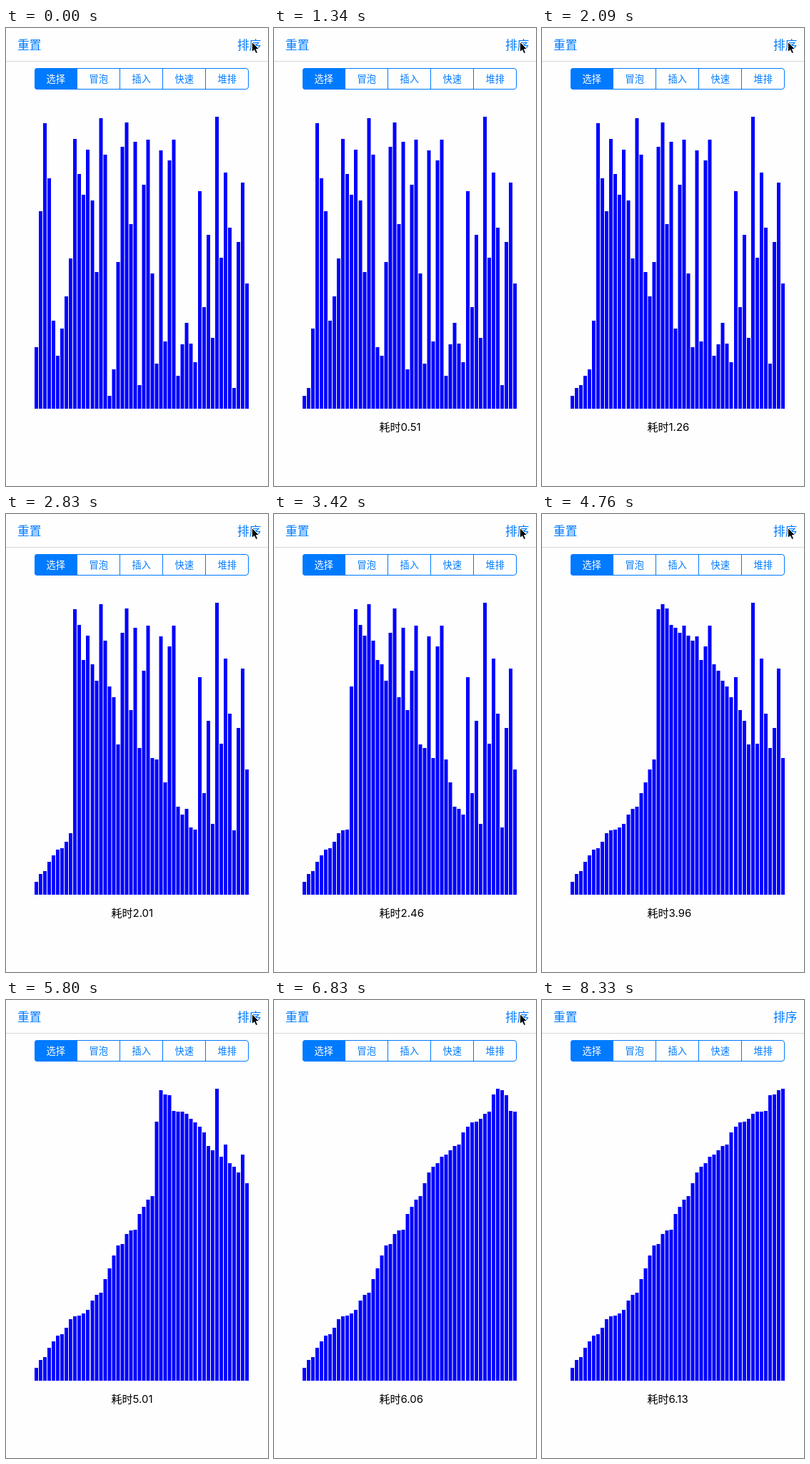
An HTML page for the animation above (8.48 s loop, 367 by 640 pixels).

```html
<!DOCTYPE html>
<html lang="zh-CN">
<head>
<meta charset="utf-8">
<title>Sorting bars</title>
<style>
  html, body { margin: 0; width: 100%; height: 100%; overflow: hidden; background: #fefefe; }
  svg { display: block; width: 367px; height: 640px; }
  text { font-family: Inter, "Noto Sans CJK SC", "Noto Sans CJK", sans-serif; }
  .nav { font-size: 16.7px; fill: #007aff; }
  .tab { font-size: 13.2px; fill: #007aff; text-anchor: middle; }
  .tab.on { fill: #fff; }
  .label { font-size: 15px; fill: #000; }
</style>
</head>
<body>
<svg id="stage" viewBox="0 0 367 640" xmlns="http://www.w3.org/2000/svg">
  <rect width="367" height="640" fill="#fefefe"/>
  <rect y="46" width="367" height="1" fill="#d8d8d8"/>
  <text class="nav" x="16" y="30.4">重置</text>
  <text class="nav" id="sortButton" x="324" y="30.4">排序</text>
  <g id="tabs">
    <path d="M100 56H44a4 4 0 0 0-4 4V82a4 4 0 0 0 4 4H100z" fill="#007aff"/>
    <rect x="40.5" y="56.5" width="299" height="29" rx="3.5" fill="none" stroke="#007aff"/>
  </g>
  <g id="bars" fill="#00f"></g>
  <text class="label" id="label" x="147.5" y="562.7"></text>
  <path id="cursor" d="M.5 .5V14.6L3.8 11.6 6 16.6 8.5 15.5 6.4 10.7H10.8Z"
        fill="#000" stroke="#fff" stroke-width="1" stroke-linejoin="round"/>
</svg>
<script>
const LOOP = 8480, START = 890, STEP = 150, FLOOR = 532;
const SHORT_STEPS = [10, 18, 22, 28, 34, 38]; // steps that begin 10 ms early
const FINAL = 613;                            // total sorting time in 1/100 s
const LEAVE = 42, GONE = 50;                  // steps between which the pointer exits
const TOPS = [
  446, 256, 133, 210, 409, 458, 420, 375, 322, 155,
  204, 233, 170, 241, 341, 126, 177, 514, 477, 327,
  166, 132, 274, 159, 499, 219, 156, 343, 469, 171,
  438, 185, 156, 486, 442, 412, 441, 467, 228, 390,
  289, 433, 124, 321, 202, 279, 503, 299, 216, 357
];

const $ = id => document.getElementById(id);

function add(parent, tag, attrs, text = "") {
  const el = document.createElementNS("http://www.w3.org/2000/svg", tag);
  for (const key in attrs) el.setAttribute(key, attrs[key]);
  el.textContent = text;
  return parent.appendChild(el);
}

["选择", "冒泡", "插入", "快速", "堆排"].forEach((name, i) => {
  if (i) add($("tabs"), "rect", { x: 39 + 60 * i, y: 56, width: 1, height: 30, fill: "#007aff" });
  add($("tabs"), "text", { class: i ? "tab" : "tab on", x: 69.7 + 60 * i, y: 75.7 }, name);
});

// The pitch is 6.02, with each bar snapped to half pixels
const bars = TOPS.map((top, i) => add($("bars"), "rect", {
  x: Math.round(2 * (40 + 6.02 * i)) / 2,
  width: 5
}));

function stepStart(n) {
  return START + STEP * n - 10 * SHORT_STEPS.filter(s => s <= n).length;
}

function stepAt(t) {
  let n = -1;
  while (stepStart(n + 1) <= t) n++;
  return n;
}

// Exchange sort, stopped after the given number of comparisons
function sorted(count) {
  const a = TOPS.slice();
  for (let i = 0; i < a.length; i++) {
    for (let j = i + 1; j < a.length; j++) {
      if (count-- <= 0) return a;
      if (a[j] > a[i]) [a[i], a[j]] = [a[j], a[i]];
    }
  }
  return a;
}

function drawCursor(n) {
  const p = Math.min(1, Math.max(0, (n - LEAVE) / (GONE - 1 - LEAVE)));
  const x = 344 + 7 * p + 9 * Math.sin(Math.PI * p);
  const y = 19 + 617 * p * p * (3 - 2 * p);
  $("cursor").setAttribute("transform", `translate(${x} ${y})`);
  $("cursor").setAttribute("visibility", n < GONE ? "visible" : "hidden");
}

let shown = null;

function render(t) {
  const n = stepAt(t);
  if (n === shown) return;
  shown = n;
  const elapsed = n < 0 ? 0 : Math.min(FINAL, 6 + 15 * n);
  sorted(elapsed * 2).forEach((top, i) => {
    bars[i].setAttribute("y", top);
    bars[i].setAttribute("height", FLOOR - top);
  });
  $("label").textContent = n < 0 ? "" : "耗时" + (elapsed / 100).toFixed(2);
  $("sortButton").setAttribute("opacity", n < 0 ? 1 : Math.min(1, 0.3 + elapsed / 70));
  drawCursor(n);
}

const begin = performance.now();
function tick() {
  render((performance.now() - begin) % LOOP);
  requestAnimationFrame(tick);
}
tick();
</script>
</body>
</html>
```
